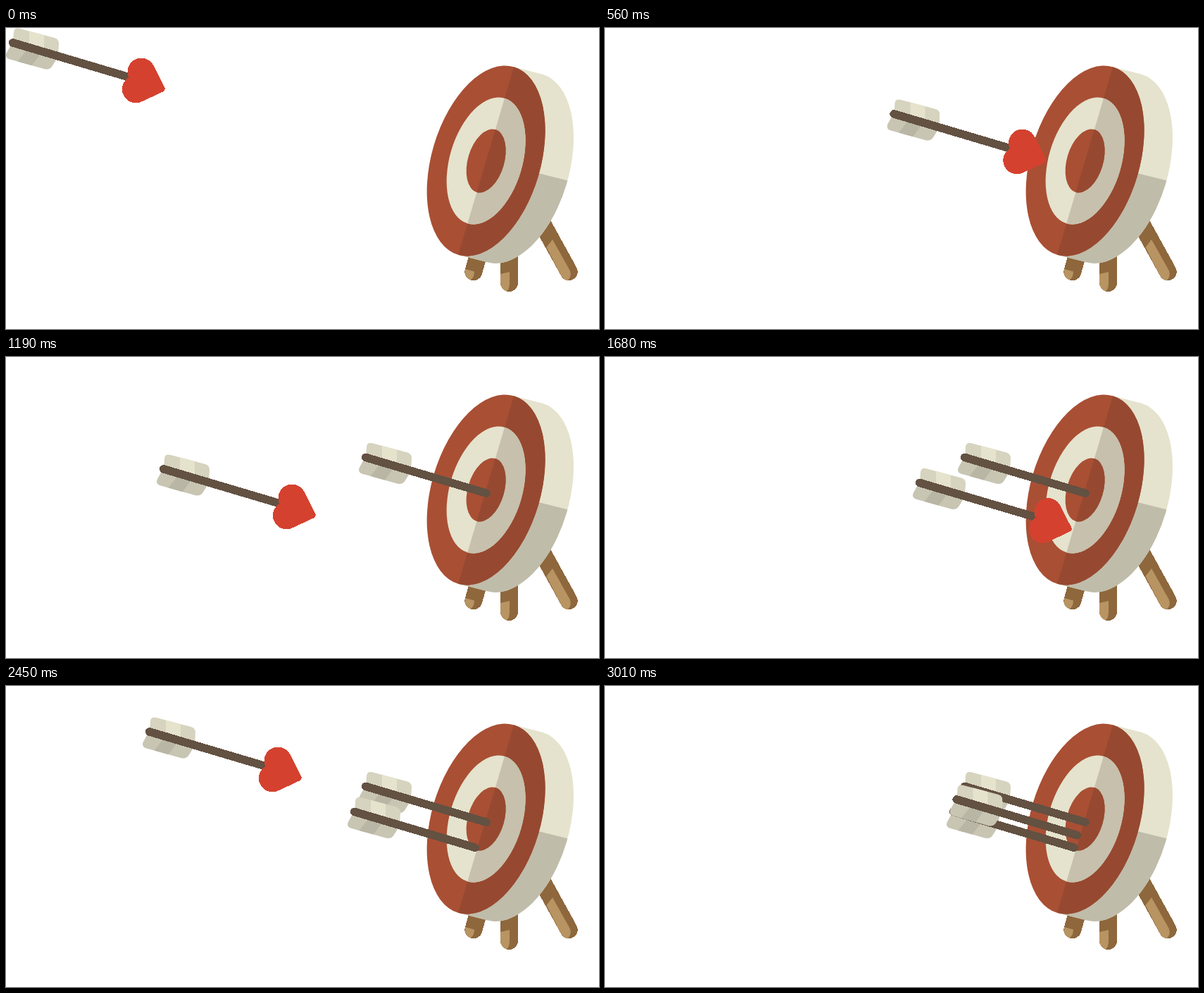
An HTML page that plays this animation: 842x427 px, repeating every 3640 ms.

```html
<!DOCTYPE html>
<html lang="en">
<head>
<meta charset="utf-8">
<title>Arrows and target</title>
<style>
  html, body { margin: 0; width: 100%; height: 100%; overflow: hidden; background: #fff; }
  svg { display: block; width: 100%; height: 100%; }
  .crisp { shape-rendering: crispEdges; }
</style>
</head>
<body>
<svg viewBox="0 0 842 427">
  <defs>
    <clipPath id="upper"><path d="M10 20L11 6Q11.5-1 19 .8L69 14Q75 16 75 22L74 40Z"/></clipPath>
    <clipPath id="lower"><path d="M6 26L1 35Q-2 41 4 44L54 58Q61 60 65 55L74.5 40L10 20Z"/></clipPath>
    <clipPath id="side">
      <ellipse cx="722" cy="198.8" rx="77.3" ry="139" transform="rotate(16.5 722 198.8)"/>
      <path d="M721 55.2L761.5 65.5L682.5 332.1L642 321.8Z"/>
    </clipPath>

    <g id="arrow">
      <g clip-path="url(#upper)">
        <path fill="#d6d3be" d="M0-5H80V65H0Z"/>
        <path fill="#e6e3cd" d="M33-5H54V65H33Z"/>
      </g>
      <g clip-path="url(#lower)">
        <path fill="#c8c5b3" d="M-5-5H80V65H-5Z"/>
        <path fill="#b9b6a5" d="M35 24L54 30L33 58L13 52Z"/>
      </g>
      <path class="crisp" stroke="#635142" stroke-width="11.6" stroke-linecap="round" d="M9.7 20.9L181 71.7"/>
    </g>
    <path id="heart" class="crisp" fill="#d5412f" stroke="#d5412f" d="M174 68A19 19 0 0 1 209 53.5L224.5 84Q226.5 88 222.5 90L192 104.2A19 19 0 0 1 175.5 70Z"/>
  </defs>

  <g class="crisp" stroke="#8e673c" stroke-width="25" stroke-linecap="round">
    <path d="M673.3 312L663.8 345.7M714.5 310V361.5M759.3 273.5L799.2 345.7"/>
  </g>
  <g fill="#b89462">
    <path d="M652.2 342L665 345.5Q665 354 659.5 357.4A12.5 12.5 0 0 1 652.2 342Z"/>
    <path d="M702 349L715 346V361Q715 370 711 373.5A12.5 12.5 0 0 1 702 361.5Z"/>
    <path d="M767.5 311L776 300L800.7 344Q803.7 352 797.7 358.2A12.5 12.5 0 0 1 788.2 351.7Z"/>
  </g>

  <g clip-path="url(#side)">
    <path fill="#e5e3cd" d="M590 40H820V340H590Z"/>
    <path fill="#c0bcaa" d="M590 164.5L820 222V340H590Z"/>
  </g>
  <g id="rings" transform="translate(681.6 188.5) rotate(16.5)"></g>
  <g id="arrows"></g>
</svg>
<script>
  const STEP = 70, LOOP = 3640;
  const NS = "http://www.w3.org/2000/svg";

  function add(parent, tag, attrs = {}) {
    const node = document.createElementNS(NS, tag);
    for (const key in attrs) node.setAttribute(key, attrs[key]);
    return parent.appendChild(node);
  }

  const rings = document.getElementById("rings");
  const red = ["#a94f34", "#964930"], cream = ["#e5e3cd", "#c7c0ac"];
  [red, cream, red].forEach(([light, dark], i) => {
    const k = 1 - i / 3, rx = 77.3 * k, ry = 139 * k;
    add(rings, "ellipse", { rx, ry, fill: light });
    add(rings, "path", { d: `M0 ${-ry}A${rx} ${ry} 0 0 1 0 ${ry}Z`, fill: dark });
  });

  // Waypoints: time, x, y. The head sinks into the board at the last one.
  const flights = [
    [[0, 0, 0], [560, 400.5, 101], [700, 501, 121.5]],
    [[770, 0, 37], [1120, 160, 99], [1190, 214, 138], [1680, 437, 157.5], [1820, 485, 157.5]],
    [[2030, 26, 8.5], [2450, 194, 44], [2520, 227, 45], [3010, 489.5, 140]]
  ];

  const layer = document.getElementById("arrows");
  const arrows = flights.map(path => {
    const group = add(layer, "g");
    add(group, "use", { href: "#arrow" });
    return { path, group, heart: add(group, "use", { href: "#heart" }) };
  });

  function position(path, t) {
    const next = path.findIndex(point => point[0] > t);
    if (next < 0) return path[path.length - 1].slice(1);
    const a = path[next - 1], b = path[next];
    const k = (t - a[0]) / (b[0] - a[0]);
    return [a[1] + (b[1] - a[1]) * k, a[2] + (b[2] - a[2]) * k];
  }

  function draw(time) {
    const t = Math.floor((time % LOOP) / STEP) * STEP;
    for (const { path, group, heart } of arrows) {
      const visible = t >= path[0][0];
      group.style.display = visible ? "" : "none";
      if (!visible) continue;
      group.setAttribute("transform", `translate(${position(path, t)})`);
      heart.style.display = t < path[path.length - 1][0] ? "" : "none";
    }
  }

  let start;
  function tick(now) {
    start ??= now;
    draw(now - start);
    requestAnimationFrame(tick);
  }
  draw(0);
  requestAnimationFrame(tick);
</script>
</body>
</html>
```
